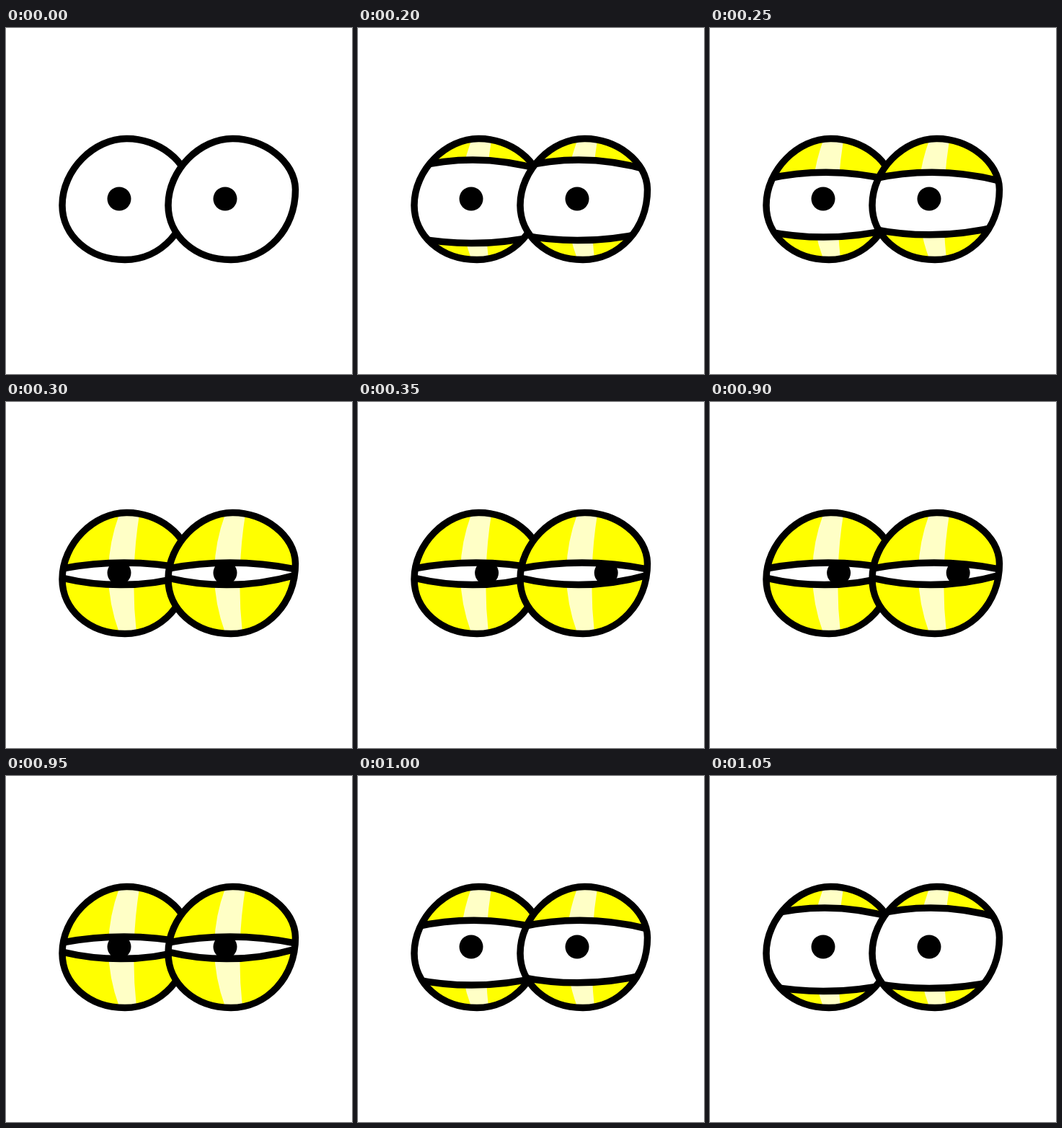
Write an HTML page with a canvas that moves like this. It is 480 px wide and 480 px high and loops after 1100 ms.

```html
<!DOCTYPE html>
<html lang="en">
<head>
<meta charset="utf-8">
<title>Side-eye</title>
<style>
html, body { margin: 0; width: 100%; height: 100%; overflow: hidden; background: #fff; }
canvas { display: block; }
</style>
</head>
<body>
<canvas id="stage" width="480" height="480"></canvas>
<script>
const ctx = document.getElementById('stage').getContext('2d');
const LOOP = 1100, STEP = 50;
const LEFT = -79, RIGHT = 98, TOP = 156, BOTTOM = 320;

// Shapes are relative to the x of each eye's pupil at rest.
const ball = new Path2D('M10 153.5C54 153 97 185 97.5 224C97.5 279 58 321.5 8 321.5' +
  'C-42 321.5 -79 288 -79 246C-79 196 -34 153.5 10 153.5Z');
const shine = new Path2D('M0 156Q-30 238 0 320H24Q15 238 28 156Z');

// reach and ease: how far and how evenly the pupil slides; droop: lower lid offset.
const eyes = [
  { x: 157, reach: 57, ease: 1.4, droop: 2 },
  { x: 304, reach: 75, ease: 0.9, droop: -2 }
];

// Heights of a lid's left end, middle and right end.
const upper = { open: [193, 183, 197], shut: [231, 223, 232], rim: TOP };
const lower = { open: [289, 296.5, 285], shut: [244, 253.5, 240], rim: BOTTOM };

function lidCurve([a, mid, b]) {
  ctx.beginPath();
  ctx.moveTo(LEFT, a);
  ctx.quadraticCurveTo((LEFT + RIGHT) / 2, 2 * mid - (a + b) / 2, RIGHT, b);
}

function drawLid({ open, shut, rim }, close, droop = 0) {
  const edge = open.map((y, j) => y + (shut[j] - y) * close + droop * (1 - close));
  ctx.save();
  lidCurve(edge);
  ctx.lineTo(RIGHT, rim);
  ctx.lineTo(LEFT, rim);
  ctx.fillStyle = '#ff0';
  ctx.fill();
  ctx.clip();
  ctx.fillStyle = '#ffffc6';
  ctx.fill(shine);
  ctx.restore();
  lidCurve(edge);
  ctx.stroke();
}

function drawEye(eye, phase) {
  const close = Math.min(1, Math.max(0, phase - 1) / 2) ** 1.2;
  const gaze = Math.max(0, phase - 3) / 2;
  ctx.save();
  ctx.translate(eye.x, 0);
  ctx.lineWidth = 9.5;
  ctx.save();
  ctx.clip(ball);
  ctx.fillStyle = '#fff';
  ctx.fill(ball);
  ctx.fillStyle = '#000';
  ctx.beginPath();
  ctx.arc(eye.reach * gaze ** eye.ease, 237, 16.5, 0, 2 * Math.PI);
  ctx.fill();
  if (phase > 0) {
    drawLid(upper, close);
    drawLid(lower, close ** 2, eye.droop);
  }
  ctx.restore();
  ctx.stroke(ball);
  ctx.restore();
}

function draw() {
  const step = Math.floor(performance.now() % LOOP / STEP);
  // 0 is wide open, 1 to 3 the lids close, 4 and 5 the pupils slide; then all runs back.
  const phase = Math.max(0, Math.min(step - 3, 22 - step, 5));
  ctx.fillStyle = '#fff';
  ctx.fillRect(0, 0, 480, 480);
  eyes.forEach(eye => drawEye(eye, phase));
  requestAnimationFrame(draw);
}
draw();
</script>
</body>
</html>
```
